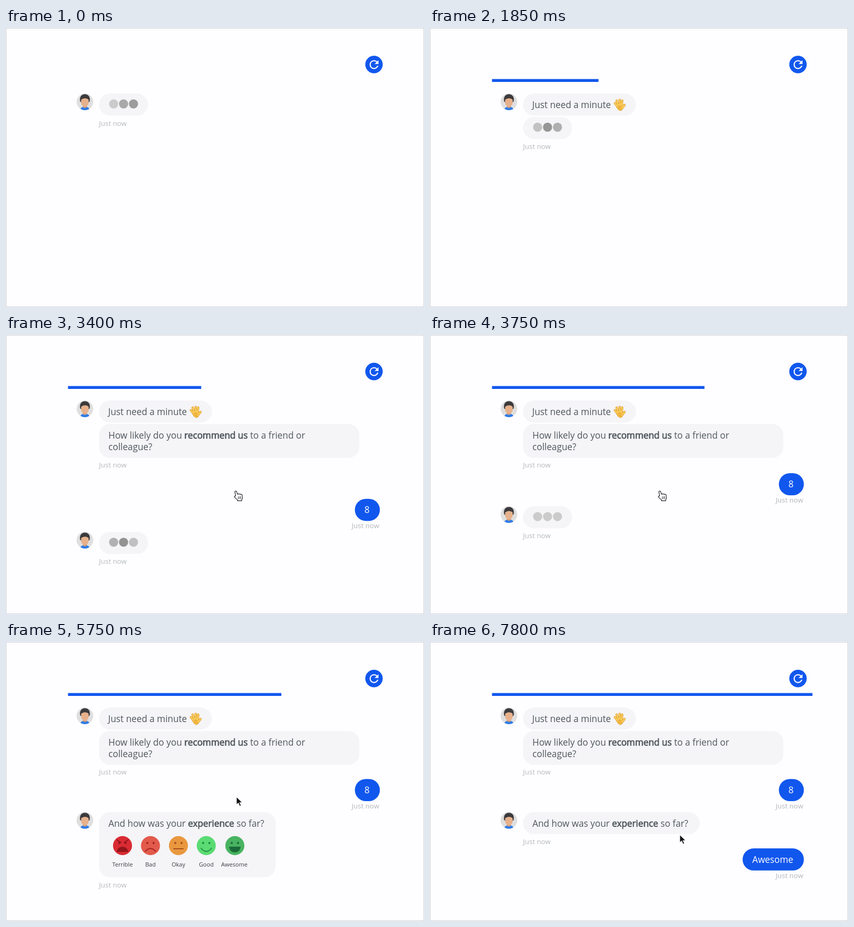
These frames come from a looping animation (800 by 533 pixels, 7.85 s). An HTML page:

```html
<!DOCTYPE html>
<html lang="en">
<head>
<meta charset="utf-8">
<title>Chat survey</title>
<style>
html, body { margin: 0; width: 100%; height: 100%; overflow: hidden; background: #fefdff; }
svg { display: block; width: 800px; height: 533px; }
text { font-family: "Open Sans", sans-serif; font-size: 17.3px; fill: #50585d; white-space: pre; }
.strong { stroke: #50585d; stroke-width: .7px; fill: #475056; }
.note { font-size: 13.4px; fill: #b3b8bc; }
.hint { font-size: 13.4px; fill: #85888c; }
.num { font-size: 12px; font-weight: 600; fill: #2f5fd0; text-anchor: middle; }
.mood { font-size: 11.1px; fill: #3c4145; text-anchor: middle; }
.reply { fill: #fff; text-anchor: middle; }
.end { text-anchor: end; }
</style>
</head>
<body>
<svg id="stage" viewBox="0 0 800 533" xmlns="http://www.w3.org/2000/svg"></svg>
<script>
const LOOP = 7850, STEP = 50, BLUE = '#1157ee';
const ASK = 750, SCORE = 2150, VOTE = 3310, MOOD = 4700, RATE = 6700;
const SLIDE = 56, MOVE = 500;

const text = (x, y, s, cls = '') => `<text x="${x}" y="${y}" class="${cls}">${s}</text>`;
const box = (x, y, w, h, fill, id = '') =>
  `<rect id="${id}" x="${x}" y="${y}" width="${w}" height="${h}" rx="21" fill="${fill}"/>`;
const bubble = (y, w, h, id) => box(178, y, w, h, '#f5f4f7', id);
const circle = (x, y, r, fill, more = '') => `<circle cx="${x}" cy="${y}" r="${r}" fill="${fill}" ${more}/>`;
const line = (d, color, w) =>
  `<path d="${d}" fill="none" stroke="${color}" stroke-width="${w}" stroke-linecap="round" stroke-linejoin="round"/>`;
const group = (id, body) => `<g id="${id}">${body}</g>`;

const dots = (id, y) => group(id, [206, 225, 244].map(x => circle(x, y, 8.7, '#cbcbcb')).join(''));

const avatar = y => `<g transform="translate(151 ${y})" clip-path="url(#face)">
  ${circle(0, 0, 16, '#dfdfdf')}
  <path d="M-9 17C-9 11-5 9.5 0 9.5S9 11 9 17Z" fill="#2f7de6"/>
  <path d="M-4 5H4V10Q0 13.5-4 10Z" fill="#d79c78"/>
  <path d="M-9.3-1C-10.5-9-7-14.5 0-14.5S10.5-9 9.3-1L7 1H-7Z" fill="#3b3a3c"/>
  <path d="M-7.2-4Q-3-7 0-6.6Q4-7 7.2-4V1C7.2 6 3.5 9.3 0 9.3S-7.2 6-7.2 1Z" fill="#e6b18c"/></g>`;

const palm = `<g transform="translate(363 147.5) rotate(-8)">
  ${line('M-5 1L-8.5-5M-2.5-1L-4.5-9.5M1-1L1.3-10M4 0L6-8M4 6L9.3 1', '#d99a2b', 4.4)}
  <path d="M-7 0Q0-5 6-1Q7 9 1 10.5Q-5 10-7 0Z" fill="#f5bd45" stroke="#d99a2b" stroke-width=".9"/>
  ${line('M-5 1L-8.5-5M-2.5-1L-4.5-9.5M1-1L1.3-10M4 0L6-8M4 6L9.3 1', '#f9cb5b', 3)}
  ${line('M-3 3Q1 1 3 4M-2 6Q1 5 2 8', '#d99a2b', .8)}</g>`;

const scores = Array.from({ length: 11 }, (_, i) => {
  const x = i < 6 ? 303.7 + 49.1 * i : 328.2 + 49.1 * (i - 6), y = i < 6 ? 249 : 298.3;
  return circle(x, y, 20.9, '#fff', 'stroke="#416fd8" stroke-width="1.3"') + text(x, y + 4.4, i, 'num');
}).join('');

const smiley = (x, name, fill, ink, features, labelX = x) =>
  `<g transform="translate(${x} 389)">${circle(0, 0, 18.2, fill)}${features(ink)}</g>` + text(labelX, 428.7, name, 'mood');
const eyes = ink => circle(-6, -5, 2.1, ink) + circle(6, -5, 2.1, ink);
const moods = [
  [223, 'Terrible', '#d92b33', '#94151c', c => eyes(c) +
    line('M-11-11L-3-6M11-11L3-6', c, 1.8) + `<path d="M-11 12Q-9 2 0 2T11 12Z" fill="${c}"/>`],
  [276.5, 'Bad', '#e25a4b', '#a52320', c => eyes(c) + line('M-10 11Q0 0 10 11', c, 1.8)],
  [330, 'Okay', '#e9983f', '#a74d1c', c => eyes(c) + line('M-9 6H9', c, 1.8)],
  [383.3, 'Good', '#5adb73', '#208a42', c => eyes(c) + line('M-10 5Q0 17 10 5', c, 1.8)],
  [438, 'Awesome', '#48b360', '#1b6b38', c => eyes(c) +
    `<path d="M-11 2H11Q10 13 0 13T-11 2Z" fill="${c}"/>`, 437]
].map(m => smiley(...m)).join('');

const stage = document.getElementById('stage');
stage.innerHTML = `
<defs><clipPath id="face"><circle r="16"/></clipPath></defs>
<rect width="800" height="533" fill="#fefdff"/>
<rect x=".5" y=".5" width="799" height="532" fill="none" stroke="#d5d5d8"/>
${circle(704.3, 69.7, 16.7, BLUE)}
<path transform="translate(691.7 57.2) scale(1.06)" fill="#fff" d="M17.65 6.35C16.2 4.9 14.21 4 12 4c-4.42 0-7.99 3.58-7.99 8s3.57 8 7.99 8c3.73 0 6.84-2.55 7.73-6h-2.08c-.82 2.33-3.04 4-5.65 4-3.31 0-6-2.69-6-6s2.69-6 6-6c1.66 0 3.14.69 4.22 1.78L13 11h7V4z"/>
<rect id="bar" x="118.7" y="97.5" width="0" height="5.5" fill="${BLUE}"/>
${avatar(141)}
${group('wait', bubble(125.3, 94, 42) + dots('dots1', 145) + text(178, 186.5, 'Just now', 'note'))}
${group('hello', bubble(125.3, 216, 42) + text(195.6, 153, 'Just need a minute') + palm)}
${group('ask', bubble(170, 94, 42, 'askBox') + dots('dots2', 189.5) +
  group('question', text(196, 197.8, 'How likely do you <tspan class="strong">recommend us</tspan> to a friend or') +
    text(196, 220, 'colleague?')) +
  group('scores', scores + text(201.5, 343.7, '0 Not Likely', 'hint') + text(651.5, 343.7, '10 Very Likely', 'hint end')) +
  `<text id="askNote" x="178" y="231" class="note">Just now</text>`)}
${group('vote', box(667.7, 261.7, 47.8, 42.3, BLUE) + text(691, 289, '8', 'reply') +
  text(714.3, 318, 'Just now', 'note end') + avatar(340.7) + bubble(325, 94, 42, 'moodBox') + dots('dots3', 344.7) +
  group('moodText', text(196, 352.7, 'And how was your <tspan class="strong">experience</tspan> so far?')) +
  group('moods', moods) + `<text id="moodNote" x="178" y="386" class="note">Just now</text>`)}
${group('rate', box(598.3, 394.3, 117.2, 42.3, BLUE) + text(656, 421.7, 'Awesome', 'reply') +
  text(714.3, 450.8, 'Just now', 'note end'))}
${group('cursor',
  group('arrow', '<path d="M0 0V15.6L3.6 12.3 6.2 18.3 9 17 6.4 11.2H11.3Z" fill="#111" stroke="#fff" stroke-width="1.1"/>') +
  group('hand', '<path d="M-2 1.2Q-.3-1 1.3 1L3 6.2Q4.6 4.7 6 6.1 7.8 5 9 6.6 11.2 5.8 12 8L12.6 13Q12.4 15.5 11.2 16.2V18.6H2.8V16.6L-2.8 11.6Q-3.4 9.2-.6 9.7Z" fill="#fff" stroke="#222" stroke-width="1.2" stroke-linejoin="round"/>' +
    line('M4.6 11V15M7 10.7V15M9.3 10.5V15', '#222', .9)))}`;

const el = {};
stage.querySelectorAll('[id]').forEach(n => { if (n.id) el[n.id] = n; });

const clamp = x => Math.min(1, Math.max(0, x));
const smooth = x => x * x * (3 - 2 * x);
const since = (t, start) => clamp((t - start) / MOVE);
const show = (name, on) => { el[name].style.display = on ? '' : 'none'; };
const set = (name, attrs) => { for (const k in attrs) el[name].setAttribute(k, attrs[k]); };

// cubic-bezier(.25, .1, .25, 1)
function ease(x) {
  let lo = 0, hi = 1, s = 0;
  for (let i = 0; i < 24; i++) {
    s = (lo + hi) / 2;
    const px = .75 * s * (1 - s) + s ** 3;
    if (px < x) lo = s; else hi = s;
  }
  return x >= 1 ? 1 : x <= 0 ? 0 : .3 * s * (1 - s) ** 2 + 3 * s * s * (1 - s) + s ** 3;
}

function pulse(name, age) {
  const period = 960, reach = 185;
  [...el[name].children].forEach((dot, i) => {
    const d = age + 18 - 130 * i;
    const gap = Math.abs(d - period * Math.round(d / period));
    const v = Math.round(203 - 63 * clamp(1 - gap / reach));
    dot.setAttribute('fill', `rgb(${v},${v},${v})`);
  });
}

function slide(name, t, start) {
  show(name, t >= start);
  set(name, { transform: `translate(0 ${SLIDE * (1 - smooth(since(t, start)))})` });
}

const track = [
  [2500, 738, 215], [2700, 471, 272], [2750, 461, 278], [3000, 440, 298], [4000, 440, 298], [4050, 441, 295.5],
  [5850, 441, 295.5], [6200, 443, 397], [7050, 443, 397], [7400, 478, 368]
];

function moveCursor(t) {
  show('cursor', t >= track[0][0]);
  const n = track.findIndex(k => k[0] > t);
  let [, x, y] = track[track.length - 1];
  if (n > 0) {
    const [t0, x0, y0] = track[n - 1], [t1, x1, y1] = track[n];
    const p = (t - t0) / (t1 - t0);
    x = x0 + (x1 - x0) * p;
    y = y0 + (y1 - y0) * p;
  }
  set('cursor', { transform: `translate(${x} ${y})` });
  const hand = (t >= 2900 && t < 4050) || (t >= 6150 && t < 7100);
  show('hand', hand);
  show('arrow', !hand);
}

function draw(t) {
  const asked = t >= SCORE, voted = t >= VOTE, mood = t >= MOOD, rated = t >= RATE;
  set('bar', { width: 203.8 * ease(since(t, ASK)) + 204.5 * ease(since(t, VOTE)) + 205 * ease(since(t, RATE)) });

  show('wait', t < ASK);
  show('hello', t >= ASK);
  pulse('dots1', t + 196);

  slide('ask', t, ASK);
  show('dots2', !asked);
  pulse('dots2', t - ASK);
  show('question', asked);
  show('scores', asked && !voted);
  set('askBox', { width: asked ? 498.3 : 94, height: !asked ? 42 : voted ? 64.7 : 196 });
  set('askNote', { y: !asked ? 231 : voted ? 253 : 385 });

  slide('vote', t, VOTE);
  show('dots3', !mood);
  pulse('dots3', t - VOTE);
  show('moodText', mood);
  show('moods', mood && !rated);
  set('moodBox', { width: mood ? 338 : 94, height: mood && !rated ? 124.3 : 42 });
  set('moodNote', { y: mood && !rated ? 468.7 : 386 });

  slide('rate', t, RATE);
  moveCursor(t);
}

function tick() {
  const t = performance.now() % LOOP;
  draw(Math.floor(t / STEP) * STEP);
  requestAnimationFrame(tick);
}
tick();
</script>
</body>
</html>
```
